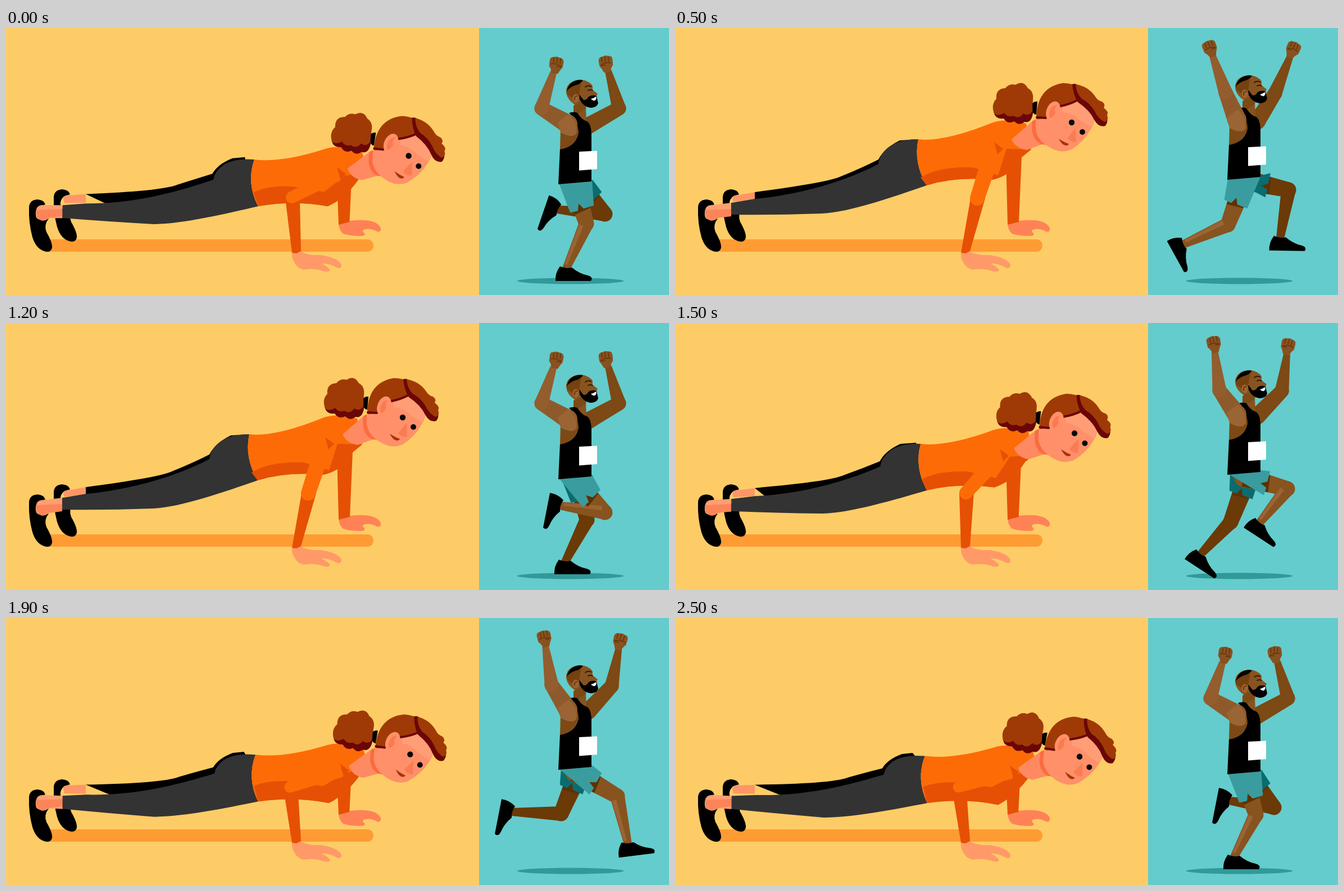
An HTML page with a canvas that plays this animation: 1180 by 475 pixels, repeating every 2600 ms.

```html
<!DOCTYPE html>
<html lang="en">
<head>
<meta charset="utf-8">
<title>Workout</title>
<style>
  html, body { margin: 0; width: 100%; height: 100%; overflow: hidden; background: #fdcc66; }
  canvas { display: block; width: 1180px; height: 475px; }
</style>
</head>
<body>
<canvas id="stage" width="1180" height="475"></canvas>
<script>
const ctx = document.getElementById('stage').getContext('2d');
const LOOP = 2600, STEP = 100;

const lerp = (a, b, k) => a + (b - a) * k;
const mixList = (a, b, k) => a.map((v, i) => lerp(v, b[i], k));

function fill(d, color) {
  ctx.fillStyle = color;
  ctx.fill(new Path2D(d));
}
function line(d, color, width) {
  ctx.strokeStyle = color;
  ctx.lineWidth = width;
  ctx.lineCap = ctx.lineJoin = 'round';
  ctx.stroke(new Path2D(d));
}
function oval(x, y, rx, ry, color, rot = 0) {
  ctx.fillStyle = color;
  ctx.beginPath();
  ctx.ellipse(x, y, rx, ry, rot, 0, Math.PI * 2);
  ctx.fill();
}
function poly(points, color) {
  fill('M' + points.map(p => p.join()).join('L') + 'Z', color);
}
function local(x, y, rot, draw) {
  ctx.save();
  ctx.translate(x, y);
  ctx.rotate(rot);
  draw();
  ctx.restore();
}
// Blend two paths that share the same commands.
function morph(a, b, k) {
  const to = b.match(/-?[\d.]+/g);
  let i = 0;
  return a.replace(/-?[\d.]+/g, n => lerp(+n, +to[i++], k).toFixed(2));
}
// Finds the two keys around t and how far t is between them.
function span(keys, t) {
  const i = keys.findIndex(k => k[0] > t);
  const a = keys[i - 1], b = keys[i];
  return [a, b, (t - a[0]) / (b[0] - a[0])];
}
function axes(a, b) {
  const len = Math.hypot(b[0] - a[0], b[1] - a[1]);
  return [(b[0] - a[0]) / len, (b[1] - a[1]) / len];
}
const along = (p, [ux, uy], f, s) => [p[0] + ux * f - uy * s, p[1] + uy * f + ux * s];

function limb(a, b, ra, rb, color) {
  const u = axes(a, b);
  poly([along(a, u, 0, ra), along(b, u, 0, rb), along(b, u, 0, -rb), along(a, u, 0, -ra)], color);
  oval(a[0], a[1], ra, ra, color);
  oval(b[0], b[1], rb, rb, color);
}

/* ---------- push-ups ---------- */
const DROP = [[0, 59], [100, 41], [200, 24], [300, 10], [400, 2], [500, 0], [1200, 0],
  [1500, 28], [1900, 74], [2100, 100], [2200, 108], [2300, 105], [2400, 94], [2500, 78], [2600, 59]];

const ORANGE = '#fd6b06', RUST = '#e65004', HAIR = '#9f3a07', WINE = '#6a0607', FACE = '#ff9069';
const SHOE = 'M41,320Q41,306 56,305Q68,306 70,314L60,317Q50,325 54,337Q58,344 76,339Q67,350 72,363Q83,382 82,391Q80,399 72,398Q54,395 47,372Q40,346 41,320Z';

function womanLegs(p) {
  local(44, -18, 0, () => fill(SHOE, '#000'));
  fill(morph('M102,304Q104,296 114,297L142,292L142,305L104,309Z',
             'M102,304Q104,296 114,298L142,298L142,315L104,313Z', p), '#ff9667');
  fill(morph('M142,292C230,280 280,272 300,262Q330,250 362,234Q372,214 400,200L433,198L400,260L260,310L142,312Z',
             'M142,298C230,300 290,297 310,290Q345,281 371,277Q380,262 405,254Q420,252 448,258L400,310L260,340L142,330Z', p), '#000');
  fill(SHOE, '#000');
  const ankle = ['M53,326Q55,314 66,315L100,311L100,333L76,337Q70,344 62,342Q52,338 53,326Z',
                 'M53,326Q55,314 66,315L101,318L101,342L76,339Q70,344 62,342Q52,338 53,326Z'];
  fill(morph(...ankle, p), '#ff9e70');
  fill('M54,324L100,322L100,335L76,338Q70,344 62,342Q52,338 54,324Z', '#fb8559');
  fill(morph('M100,311L142,304C200,299 290,280 362,242Q364,225 380,212Q400,197 433,198Q424,240 448,280C390,300 310,328 262,330Q180,333 100,332Z',
             'M101,318L142,318C230,322 290,309 374,289Q376,277 390,267Q410,255 448,259Q430,300 449,343C390,352 320,362 265,362Q180,352 101,342Z', p), '#333');
}

function womanHead(p) {
  ctx.save();
  ctx.translate(690 + 19 * p, 160 + 99 * p);
  ctx.rotate(0.12 * p);
  ctx.translate(-690, -160);
  // ponytail
  fill('M567,146Q568,163 585,161Q592,172 604,166Q612,175 622,167Q634,170 637,152L639,138Z', WINE);
  fill('M568,152Q562,136 572,126Q570,108 588,107Q595,98 606,101Q620,92 628,107Q639,113 637,128L636,148Q630,158 620,152Q612,163 602,156Q592,160 586,151Q575,158 568,152Z', HAIR);
  // neck
  fill('M599,198L638,164L656,206L626,217Q606,214 599,198Z', '#ff8a62');
  fill('M636,166L642,162L662,208L652,207Q632,198 636,166Z', '#fb6b40');
  // hair, face
  fill('M643,162Q643,106 690,98Q722,98 744,126L740,160L660,165Z', HAIR);
  fill('M642,163L662,160L688,139L718,128L747,150Q748,168 740,180Q728,202 706,216Q690,223 674,216Q645,203 642,180Z', FACE);
  fill('M718,128L747,150Q747,165 741,176L722,165Q706,150 690,150L689,139Z', '#ff9d76');
  line('M644,159L660,160M686,139Q702,136 717,128', WINE, 4);
  fill('M707,100Q716,97 719,106Q722,122 740,130L768,155Q772,166 766,174Q754,178 746,163Q738,146 717,132Q709,120 707,100Z', WINE);
  fill('M713,100Q736,104 748,122Q752,129 760,131Q767,136 763,142Q773,149 769,155Q773,164 764,167Q752,160 747,148Q738,133 724,126Q714,116 713,100Z', HAIR);
  fill('M636,134Q640,130 645,131L643,154Q639,154 637,150Z', '#000');
  oval(673, 148, 12, 18, FACE, 0.35);
  fill('M666,152Q668,138 680,137Q674,144 677,151Q672,160 667,160Z', '#fb7a50');
  // features
  fill('M713,178L698,196Q703,203 714,203Z', '#f97c52');
  oval(706, 168, 5.2, 5.2, '#0a0a0a');
  oval(725, 185, 5, 5, '#0a0a0a');
  fill('M683,197Q694,204 701,206Q699,211 692,208Q687,205 683,197Z', '#a8330f');
  ctx.restore();
}

function woman(t) {
  const [a, b, k] = span(DROP, t);
  const p = lerp(a[1], b[1], k) / 100;
  fill('M76,376H643A11,11 0 0 1 643,398H76Z', '#ff9b33');
  womanLegs(p);
  // far arm
  fill('M592,349Q610,340 640,342Q662,344 667,356Q668,364 660,362Q650,356 640,358Q631,360 638,365Q641,370 630,370Q612,370 600,366Q593,360 592,349Z', '#ff8257');
  fill(morph('M589,230L617,228L612,345L592,350Z', 'M590,325L613,310L611,345L592,350Z', p), RUST);
  // shirt
  fill(morph('M433,198Q480,203 566,168Q590,160 625,170L634,216L617,230Q600,262 565,270Q500,264 448,280Q424,240 433,198Z',
             'M448,259Q500,266 575,246Q600,240 640,255L650,285L638,292Q608,332 578,350Q520,336 449,343Q430,300 448,259Z', p), ORANGE);
  fill(morph('M437,266Q470,246 530,248L575,262L590,215L634,216L617,230Q600,262 565,270Q500,264 448,280Z',
             'M443,310Q470,302 500,306L560,312L612,296L650,285L638,292Q608,332 578,350Q520,336 449,343Z', p), RUST);
  womanHead(p);
  // near arm
  fill('M509,399L525,397Q535,405 560,404Q590,408 597,421Q597,430 588,426Q574,418 562,419Q576,427 577,431Q573,436 560,431Q545,427 530,430Q518,428 512,415Q508,408 509,399Z', '#ff9a68');
  const elbow = [538 - 38 * Math.sqrt(p), lerp(303, 300, p)];
  const shoulder = [lerp(566, 602, p), lerp(217, 293, p)];
  poly([[elbow[0] - 12, elbow[1]], [elbow[0] + 14, elbow[1]], [525, 397], [517, 401], [509, 400]], RUST);
  limb(shoulder, elbow, lerp(15, 10, p), lerp(13, 9, p), ORANGE);
  poly([[shoulder[0] + 2, shoulder[1] - 14], [shoulder[0] + 18, shoulder[1] - 2], [shoulder[0] + 8, shoulder[1] + 8]], RUST);
}

/* ---------- runner ---------- */
// arms: near elbow, near fist, far elbow, far fist; legs: knee, ankle, shoe angle
const POSES = {
  stand:  { drop: 8, arms: [953, 143, 979, 65, 1091, 143, 1068, 63],
            legs: [[1033, 348, 997, 428, 0], [1066, 331, 981, 323, 109]] },
  push:   { drop: 0, arms: [969, 120, 959, 37, 1080, 121, 1091, 41],
            legs: [[1090, 295, 1040, 356, 33], [989, 354, 935, 412, 33]] },
  stride: { drop: 0, arms: [980, 115, 952, 36, 1068, 116, 1100, 38],
            legs: [[984, 350, 904, 385, 61], [1092, 288, 1077, 374, 1]] },
  fly:    { drop: 0, arms: [971, 119, 958, 36, 1078, 121, 1093, 41],
            legs: [[1088, 317, 1107, 402, -7], [988, 348, 900, 345, 101]] },
  reach:  { drop: 0, arms: [959, 129, 967, 48, 1086, 127, 1080, 48],
            legs: [[1010, 354, 933, 335, 117], [1079, 327, 1087, 412, -3]] },
  land:   { drop: 0, arms: [962, 128, 965, 47, 1085, 127, 1083, 47],
            legs: [[1078, 330, 1088, 419, -4], [1014, 354, 934, 321, 111]] },
  settle: { drop: 8, arms: [953, 143, 979, 65, 1091, 143, 1068, 64],
            legs: [[1034, 350, 995, 425, 0], [1066, 337, 986, 325, 101]] }
};
// time, pose, legs swapped
const RUN = [[0, 'stand', 0], [250, 'push', 1], [500, 'stride', 0], [700, 'fly', 1], [900, 'reach', 0],
  [950, 'land', 1], [1200, 'settle', 1], [1300, 'stand', 1], [1500, 'push', 0], [1700, 'stride', 1],
  [1900, 'fly', 0], [2100, 'land', 0], [2400, 'settle', 0], [2500, 'settle', 0], [2600, 'stand', 0]];

const LIGHT = '#9a6434', WARM = '#87531f', MID = '#7d4914', DIM = '#6b3a07', DEEP = '#5f3000';

function shin([kx, ky, ax, ay]) {
  const turn = Math.PI * 2;
  return [(Math.atan2(ay - ky, ax - kx) + turn) % turn, Math.hypot(ax - kx, ay - ky)];
}
function mixLeg(a, b, k) {
  const [x, y, , , rot] = mixList(a, b, k);
  const [ang, len] = mixList(shin(a), shin(b), k);
  return { knee: [x, y], ankle: [x + Math.cos(ang) * len, y + Math.sin(ang) * len], rot: rot * Math.PI / 180 };
}

function leg({ knee, ankle, rot }, hip, near, hem) {
  const u = axes(hip, knee), v = axes(knee, ankle);
  const skin = near ? WARM : DIM;
  limb(hip, knee, 18, 13.5, skin);
  limb(knee, ankle, 13, 7, skin);
  if (near) {
    poly([along(knee, v, 6, 11), along(ankle, v, -6, 6), along(ankle, v, -6, 1), along(knee, v, 6, 3)], LIGHT);
  }
  poly([along(hip, u, 0, 17), along(hip, u, hem + 6, 15), along(hip, u, hem + 2, -15), along(hip, u, 0, -17)], DEEP);
  local(...ankle, rot, () =>
    fill('M-11,-4Q-20,8 -19,22H44Q49,15 38,12Q23,9 10,-2Q0,1 -11,-4Z', '#000'));
}

function shorts(knee, hip, waist, hem, half, color) {
  const u = axes(hip, knee);
  poly([waist[0], along(hip, u, hem, half), along(hip, u, hem + 1, 8), along(hip, u, hem - 11, 3),
    along(hip, u, hem, -3), along(hip, u, hem, -half), waist[1]], color);
}

function fist(x, y, rot, flip) {
  local(x, y, rot, () => {
    ctx.scale(flip, 1);
    fill('M-12,-6Q-12,-13 -5,-13Q0,-15 4,-13Q12,-13 13,-6L12,4Q8,9 5,16L-6,16Q-8,8 -12,4Z', '#885120');
    line('M-5,-11V-3M1,-12V-3M7,-11V-3M-9,0Q0,-3 9,2M2,3L9,3', '#5b2d05', 1.2);
  });
}

function arm(shoulder, elbow, hand, near) {
  const u = axes(elbow, hand);
  const lean = Math.atan2(u[0], -u[1]) * 0.8 + (near ? -0.14 : 0.14);
  const wrist = along(hand, u, -16, 0);
  limb(shoulder, elbow, near ? 17 : 15, 12.5, near ? '#8f5a2b' : MID);
  limb(elbow, wrist, 12.5, 6, near ? '#935d2e' : MID);
  fist(...hand, lean, near ? 1 : -1);
}

function runnerHead() {
  fill('M1010,154L1012,128Q997,118 997,104Q998,86 1022,84Q1038,85 1044,95L1044,102L1053,109Q1052,113 1048,114L1053,128Q1050,134 1032,132L1033,160Z', WARM);
  fill('M1010,130L1022,124L1033,134L1022,142L1010,148Z', MID);
  fill('M998,101Q1008,88 1024,86L1020,110L1010,116Q999,114 997,104Z', '#74410f');
  fill('M998,104Q1001,91 1012,86Q1020,83 1027,85Q1022,92 1013,94Q1004,97 998,104Z', '#000');
  oval(1014, 117, 5.5, 7.5, LIGHT);
  line('M1012,120Q1011,113 1017,113', DEEP, 1.5);
  fill('M1020,110L1028,120Q1034,120 1037,114Q1044,110 1051,113L1054,126Q1051,134 1040,134Q1027,132 1021,119Z', '#000');
  fill('M1041,118Q1046,117 1050,114Q1052,118 1048,121Q1044,122 1041,118Z', '#fff');
  line('M1031,97Q1036,93 1041,96M1036,103Q1040,101 1044,103', '#1c0c00', 1.6);
}

function runner(t) {
  const [a, b, k] = span(RUN, t);
  const A = POSES[a[1]], B = POSES[b[1]];
  const dy = lerp(A.drop, B.drop, k);
  const arms = mixList(A.arms, B.arms, k);
  const [near, far] = [0, 1].map(i => mixLeg(A.legs[i ^ a[2]], B.legs[i ^ b[2]], k));
  const nearHip = [1013, 274 + dy], farHip = [1020, 272 + dy];

  fill('M842,0H1180V475H842Z', '#64cccc');
  oval(1004.5, 450, 95, 5.5, '#329999');
  arm([1036, 166 + dy], arms.slice(4, 6), arms.slice(6, 8), false);
  leg(far, farHip, false, 36);
  shorts(far.knee, farHip, [[988, 268 + dy], [1044, 262 + dy]], 36, 22, '#0a6c6f');
  leg(near, nearHip, true, 42);
  shorts(near.knee, nearHip, [[984, 268 + dy], [1043, 262 + dy]], 42, 22, '#3a9c9e');

  local(0, dy, 0, () => {
    runnerHead();
    fill('M1002,143Q1012,140 1017,143Q1024,155 1034,158Q1041,162 1042,180V265L983,270L986,207Q1012,204 1018,182Q1020,160 1002,143Z', '#000');
    fill('M1020,212L1052,210.5V243L1020,245.5Z', '#fff');
    fill('M1000,144Q1020,160 1019,180Q1012,204 986,208L987,172Z', MID);
  });
  arm([1000, 163 + dy], arms.slice(0, 2), arms.slice(2, 4), true);
  local(0, dy, 0, () => fill('M1001,145Q1017,158 1016,178Q1010,190 987,178L982,160Z', LIGHT));
}

function frame() {
  const t = Math.floor(performance.now() / STEP) * STEP % LOOP;
  fill('M0,0H842V475H0Z', '#fdcc66');
  woman(t);
  runner(t);
  requestAnimationFrame(frame);
}
frame();
</script>
</body>
</html>
```
